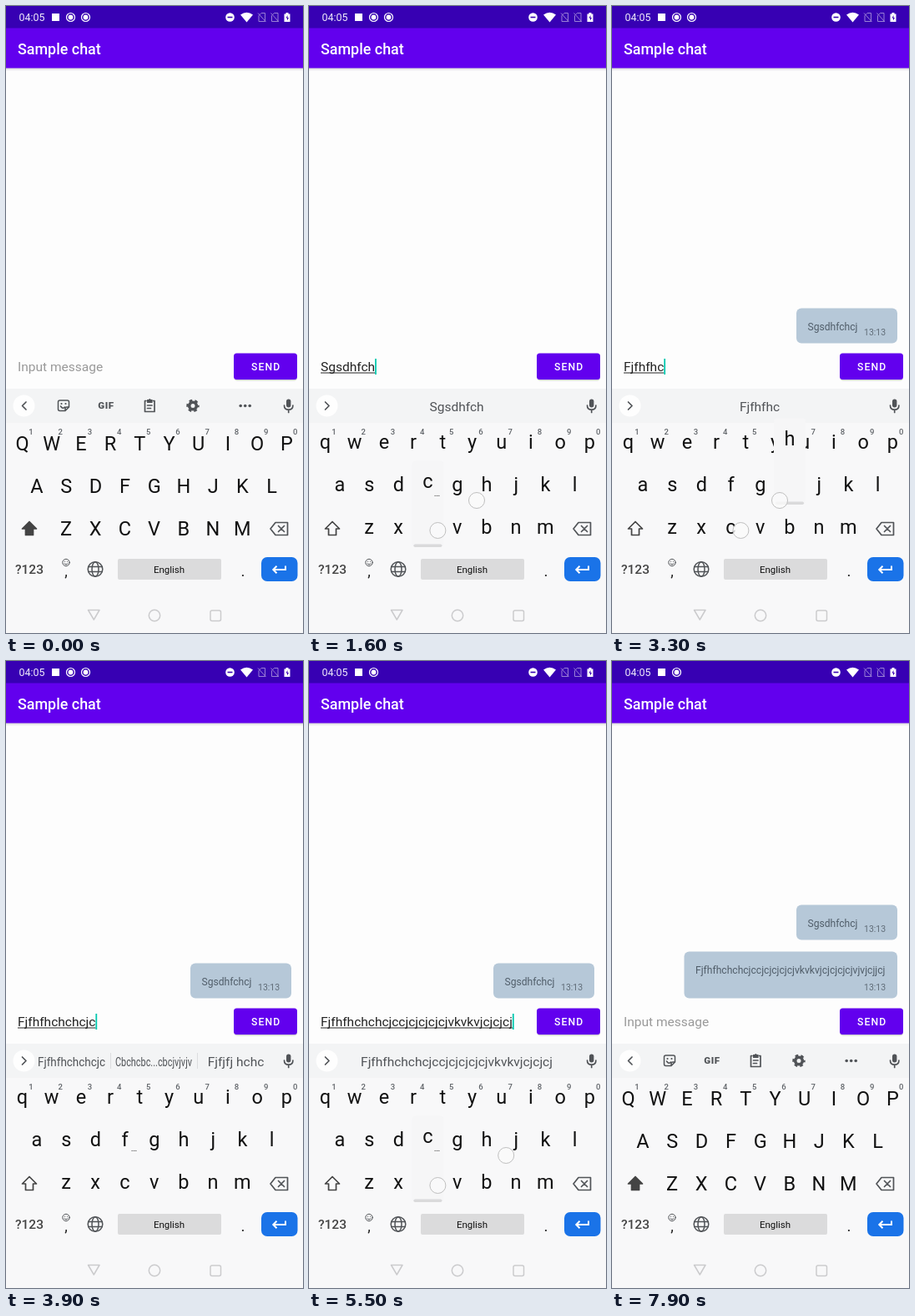
An HTML page for the animation above (8 s loop, 356 by 752 pixels).

```html
<!DOCTYPE html>
<html lang="en">
<head>
<meta charset="utf-8">
<title>Sample chat</title>
<style>
html, body { margin: 0; width: 356px; height: 752px; overflow: hidden; background: #fdfdfd; }
svg { display: block; }
text { font-family: Roboto, "Noto Sans", sans-serif; white-space: pre; }
.mid { text-anchor: middle; }
.line { fill: none; stroke: #505357; stroke-width: 1.7; stroke-linecap: round; stroke-linejoin: round; }
.solid { fill: #505357; }
.white { fill: #fff; }
.key { font-size: 23.5px; fill: #111; text-anchor: middle; }
.hint { font-size: 9.5px; font-weight: 500; fill: #5f6368; text-anchor: middle; }
.input { font-size: 15.5px; fill: #222; }
.word { font-size: 15.5px; fill: #505357; text-anchor: middle; }
.bubble rect { fill: #b6c8d8; }
.bubble text { font-size: 12.1px; fill: #505d69; }
.bubble .time { font-size: 10.5px; fill: #606c78; }
.touch { fill: #fafafa; fill-opacity: .8; stroke: #bfbfbf; }
.nav { fill: none; stroke: #cbcbcd; stroke-width: 1.5; stroke-linejoin: round; }
</style>
</head>
<body>
<svg width="356" height="752" viewBox="0 0 356 752">
  <defs>
    <linearGradient id="shade" x2="0" y2="1">
      <stop stop-color="#000" stop-opacity=".16"/>
      <stop offset="1" stop-color="#000" stop-opacity="0"/>
    </linearGradient>
    <clipPath id="field"><rect x="10" y="418" width="256" height="32"/></clipPath>
  </defs>
  <rect width="356" height="752" fill="#fdfdfd"/>

  <!-- header -->
  <rect y="74" width="356" height="4" fill="url(#shade)"/>
  <rect y="26" width="356" height="48.5" fill="#6200ee"/>
  <rect width="356" height="26.5" fill="#3700b3"/>
  <text x="14" y="57.5" font-size="17.9" font-weight="500" fill="#fff">Sample chat</text>
  <text x="15.5" y="18" font-size="12.4" fill="#f1ecfb">04:05</text>
  <rect x="55" y="9" width="9" height="9" class="white"/>
  <g fill="none" stroke="#fff" stroke-width="1.2">
    <circle cx="77.5" cy="13.5" r="5"/><circle cx="77.5" cy="13.5" r="2.9" class="white" stroke="none"/>
    <g id="second"><circle cx="95.5" cy="13.5" r="5"/><circle cx="95.5" cy="13.5" r="2.9" class="white" stroke="none"/></g>
  </g>
  <circle cx="268.500" cy="13.500" r="5.300" class="white"/>
  <path d="M265.500 13.500h6" stroke="#3700b3" stroke-width="1.600"/>
  <path class="white" d="M288.500 19.500 281 10.500q7.500-5.500 15 0z"/>
  <g fill="none" stroke="#9a80d6" stroke-width="1">
    <path id="sim" d="M303 11.500l3-3h4.500v10H303zM302 8.500l9.500 10.500"/>
    <use href="#sim" x="15.500"/>
  </g>
  <path class="white" d="M333.500 9.500h2v-1.500h3v1.500h2v9.500h-7z"/>
  <path d="M337.500 11l-2 3.500h1.500v3l2-3.600h-1.500z" fill="#3700b3"/>

  <!-- messages -->
  <g id="first" class="bubble">
    <rect x="221" y="362.5" width="121" height="42" rx="6"/>
    <text x="234.5" y="389">Sgsdhfchcj</text>
    <text x="302" y="395" class="time">13:13</text>
  </g>
  <g id="next" class="bubble">
    <rect x="86.500" y="348.500" width="255.500" height="56" rx="6"/>
    <text x="100" y="375" id="long"></text>
    <text x="302" y="395" class="time">13:13</text>
  </g>

  <!-- input row -->
  <text id="prompt" x="14" y="438" class="input" style="fill:#999">Input message</text>
  <g clip-path="url(#field)">
    <text class="input row" x="14"></text><path class="under" stroke="#222"/>
    <text class="input row" x="14"></text><path class="under" stroke="#222"/>
    <rect id="caret" width="1.800" height="19" fill="#03c9b0"/>
  </g>
  <rect x="273.500" y="418.500" width="75.500" height="31" rx="4" fill="#000" opacity=".16"/>
  <rect x="273" y="416.500" width="76" height="31.500" rx="3.500" fill="#6200ee"/>
  <text x="294" y="437.300" font-size="12.2" font-weight="500" letter-spacing="1.1" fill="#fff">SEND</text>

  <!-- keyboard -->
  <rect y="459" width="356" height="293" fill="#f8f8f9"/>
  <rect y="459" width="356" height="41" fill="#f3f4f5"/>
  <circle cx="21.500" cy="479.500" r="13" fill="#fefefe"/>
  <g id="tools">
    <path class="line" d="M24 475l-4.500 4.500 4.500 4.500"/>
    <path class="line" style="stroke-width:1.500" d="M64.500 473h9q2 0 2 2v6l-4.500 4.500h-6.500q-2 0-2-2v-8.500q0-2 2-2zM75 481h-2q-2 0-2 2v2M65.500 480q2.500 4 5 1"/>
    <circle class="solid" cx="66.500" cy="477" r="1.100"/><circle class="solid" cx="71.500" cy="477" r="1.100"/>
    <text x="120" y="483.300" class="mid" font-size="11.500" font-weight="900" letter-spacing=".6" fill="#505357">GIF</text>
    <path class="line" d="M168 473.500h-1.500v13h11.500v-13h-1.500M169.500 479h5.500M169.500 482.500h4"/>
    <path class="solid" d="M169 472h2q1.300-2 2.600 0h2v4H169z"/>
    <circle cx="224" cy="479.500" r="4.300" fill="none" stroke="#505357" stroke-width="3.600"/>
    <circle cx="224" cy="479.500" r="6.500" fill="none" stroke="#505357" stroke-width="2.400" stroke-dasharray="3.600 3.207" stroke-dashoffset="1.800"/>
    <circle class="solid" cx="281.200" cy="479.500" r="1.800"/><circle class="solid" cx="286.700" cy="479.500" r="1.800"/><circle class="solid" cx="292.200" cy="479.500" r="1.800"/>
  </g>
  <g id="strip">
    <path class="line" d="M19.500 475l4.500 4.500-4.500 4.500"/>
    <text class="word" y="0"></text><text class="word" y="0"></text><text class="word" y="0"></text>
    <path id="split" d="M125.500 470v19M229.500 470v19" stroke="#dcdddf"/>
  </g>
  <rect x="336" y="471.500" width="5.400" height="10" rx="2.700" class="solid"/>
  <path class="line" d="M333.500 479q0 5.200 5.200 5.200t5.200-5.200M338.700 484.500v3"/>

  <g id="keys"></g>
  <path id="shift" class="line" style="stroke:#444" d="M28 618.500l8.500 8.500h-4v7.500h-9V627h-4z"/>
  <path class="line" d="M323 619.500h14.500v15H323l-6-7.500zM326.500 623.500l7 7M333.500 623.500l-7 7"/>
  <text x="11" y="681" font-size="15.500" fill="#444" font-weight="500">?123</text>
  <text x="72" y="684" class="mid" font-size="18" fill="#222">,</text>
  <g class="line" style="stroke-width:1">
    <circle cx="72" cy="667.500" r="4.200"/><path d="M70 669q2 2 4 0M70.500 666.200v.2M73.500 666.200v.2"/>
  </g>
  <g class="line" style="stroke-width:1.500">
    <circle cx="107" cy="675.500" r="8.800"/><ellipse cx="107" cy="675.500" rx="4" ry="8.800"/>
    <path d="M99 672.500h16M99 678.500h16"/>
  </g>
  <rect x="134" y="663" width="124" height="25" rx="2" fill="#dbdbdc"/>
  <text x="195.500" y="680" class="mid" font-size="11.500" fill="#111">English</text>
  <text x="284" y="684" class="mid" font-size="19" fill="#222">.</text>
  <rect x="306" y="661" width="43.500" height="29" rx="7" fill="#1a73e8"/>
  <path class="line" style="stroke:#fff;stroke-width:2;stroke-linecap:butt;stroke-linejoin:miter" d="M335 671.500v4.500h-14M324.500 671.800l-4.200 4.200 4.200 4.200"/>

  <g id="popup">
    <rect width="38" height="103" x="-19" y="-87" rx="4" fill="#f6f6f7"/>
    <rect width="34" height="3.500" x="-17" y="13" rx="1.700" fill="#dadadb"/>
    <text class="key" y="-55"></text>
    <text class="mid" x="11" y="-45" font-size="11" fill="#333">…</text>
  </g>
  <circle class="touch" r="9.500"/><circle class="touch" r="9.500"/>

  <g class="nav">
    <path d="M98.500 724.500h13.500l-6.700 11.500z"/>
    <circle cx="178" cy="731" r="6.700"/>
    <rect x="245" y="725" width="12.500" height="12.500" rx="2"/>
  </g>
</svg>

<script>
const LOOP = 8000, STEP = 100, HOLD = 110, LINGER = 60, PITCH = 35.2, WRAP = 37;
const $ = id => document.getElementById(id);
const all = sel => [...document.querySelectorAll(sel)];
const show = (el, on) => el.setAttribute("visibility", on ? "visible" : "hidden");
const ramp = (t, from, span) => Math.min(1, Math.max(0, (t - from) / span));
const ease = p => (1 - Math.cos(Math.PI * p)) / 2;

const drafts = [
  { text: "Sgsdhfchcj", sent: 2300, typed: i => 600 + 120 * i },
  { text: "Fjfhfhchchcjc" + "cj".repeat(5) + "vkvkvj" + "cj".repeat(4) + "vjvjcjjcj", sent: 7400,
    typed: i => i < 14 ? 2700 + 85 * i : i < 36 ? 4030 + 69 * (i - 14) : 5580 + 132 * (i - 36) }
];
$("long").textContent = drafts[1].text;

function add(cls, x, y, label) {
  const el = document.createElementNS("http://www.w3.org/2000/svg", "text");
  el.setAttribute("class", cls);
  el.setAttribute("x", x);
  el.setAttribute("y", y);
  el.textContent = label;
  $("keys").append(el);
  return el;
}

const keys = {};
[["qwertyuiop", 19.5, 533], ["asdfghjkl", 37, 584], ["zxcvbnm", 72, 635]].forEach(([row, left, y], r) =>
  [...row].forEach((ch, i) => {
    const x = left + PITCH * i;
    keys[ch] = { x, y, el: add("key", x, y, ch) };
    if (r === 0) add("hint", x + 10.5, 514, (i + 1) % 10);
  }));

const rows = all(".row"), unders = all(".under"), words = all(".word"), touches = all(".touch");
const popup = $("popup"), [popLetter, popDots] = popup.querySelectorAll("text");

function setWord(i, label, x, room) {
  const el = words[i];
  el.textContent = label;
  const squeeze = Math.min(1, room / (el.getComputedTextLength() || 1));
  el.setAttribute("transform", `translate(${x} 485.5) scale(${squeeze} 1)`);
}

function drawInput(text, blinkOn) {
  const lines = [text.slice(0, WRAP), text.slice(WRAP)];
  const two = lines[1] !== "";
  let end = 14;
  lines.forEach((line, i) => {
    const y = two ? 424 + 18.5 * i : 438;
    rows[i].textContent = line;
    rows[i].setAttribute("y", y);
    const right = 14 + (line ? rows[i].getComputedTextLength() : 0);
    unders[i].setAttribute("d", line ? `M14 ${y + 2}H${right}` : "");
    if (i === 0 || two) end = right;
  });
  $("caret").setAttribute("x", end);
  $("caret").setAttribute("y", two ? 427.5 : 423);
  show($("caret"), blinkOn);
  show($("prompt"), !text);
}

function drawStrip(text, isSecond) {
  const three = isSecond && (text.length === 12 || text.length === 13);
  show($("tools"), !text);
  $("strip").style.display = text ? "" : "none";
  show($("split"), three);
  setWord(0, text, three ? 78.5 : 177, three ? 81 : 278);
  setWord(1, three ? "Cbchcbc...cbcjvjvjv" : "", 177, 92);
  setWord(2, three ? "Fjfjfj hchc" : "", 275.5, 92);
}

function drawKeys(lower) {
  for (const ch in keys) {
    const { y, el } = keys[ch];
    el.textContent = lower ? ch : ch.toUpperCase();
    el.setAttribute("y", lower ? y - 2.5 : y);
  }
  $("shift").style.fill = lower ? "none" : "#444";
}

function drawPress(t, draft, count) {
  const { text, typed, sent } = draft;
  const next = text[count];
  const held = next && t >= typed(count + 1) - HOLD;
  show(popup, held);
  if (held) {
    const k = keys[next.toLowerCase()];
    popup.setAttribute("transform", `translate(${k.x} ${k.y - 2.5})`);
    popLetter.textContent = next;
    show(popDots, "cs".includes(next));
  }
  const spots = [];
  for (const i of [count, count + 1]) {
    const ch = text[i - 1];
    if (ch && t >= typed(i) - HOLD && t < typed(i) + LINGER) {
      const k = keys[ch.toLowerCase()];
      spots.push(k.x < 190 ? [k.x + 12, k.y - 6] : [k.x - 12, k.y + 9]);
    }
  }
  if (t >= sent - STEP && t < sent) spots.push([312, 440]);
  touches.forEach((el, i) => {
    show(el, spots[i]);
    if (spots[i]) el.setAttribute("transform", `translate(${spots[i]})`);
  });
}

function draw(t) {
  const second = t >= drafts[0].sent;
  const draft = drafts[second ? 1 : 0];
  const done = t >= drafts[1].sent;
  let count = 0;
  while (count < draft.text.length && t >= draft.typed(count + 1)) count++;
  const text = done ? "" : draft.text.slice(0, count);
  const since = done ? drafts[1].sent : count ? draft.typed(count) : second ? drafts[0].sent : -600;

  drawInput(text, Math.floor((t - since) / 500) % 2 === 0);
  drawStrip(text, second);
  drawKeys(text !== "");
  drawPress(t, draft, count);

  const lift = ease(ramp(t, drafts[1].sent, 200));
  $("first").setAttribute("opacity", ramp(t, drafts[0].sent - 50, 200));
  $("first").setAttribute("transform", `translate(0 ${-70 * lift})`);
  $("next").setAttribute("opacity", ramp(t, drafts[1].sent + 150, 200));
  show($("second"), t < 4600);
}

function tick(now) {
  draw(Math.floor(now % LOOP / STEP) * STEP);
  requestAnimationFrame(tick);
}
draw(0);
requestAnimationFrame(tick);
</script>
</body>
</html>
```
